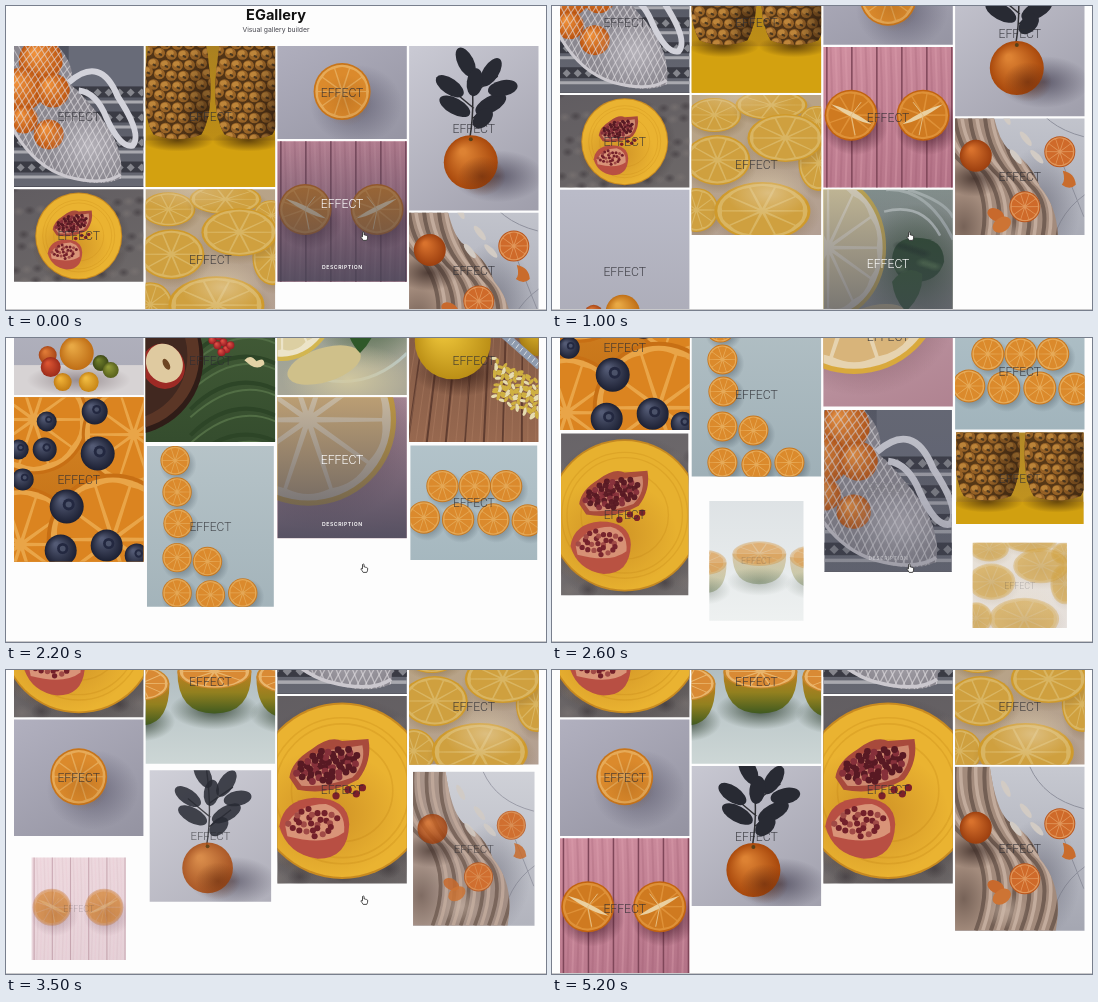
An HTML page with a canvas for the animation above (5.3 s loop, 540 px wide and 304 px high).

```html
<!DOCTYPE html>
<html lang="en">
<head>
<meta charset="utf-8">
<title>EGallery</title>
<style>
html, body { margin: 0; width: 100%; height: 100%; overflow: hidden; background: #fdfdfd; }
canvas { display: block; }
</style>
</head>
<body>
<canvas id="stage" width="540" height="304"></canvas>
<script>
const g = document.getElementById('stage').getContext('2d');
const LOOP = 5300, COL_W = 129.4, COL_STEP = 131.7, GAP = 2.2;
const clamp = v => Math.max(0, Math.min(1, v));
const smooth = v => (v = clamp(v), v * v * (3 - 2 * v));

// Drawing helpers; every picture is drawn around its own centre.
function oval(x, y, rx, ry, fill, rot = 0) {
  g.beginPath();
  g.ellipse(x, y, rx, ry, rot, 0, 7);
  g.fillStyle = fill;
  g.fill();
}
const disc = (x, y, r, fill) => oval(x, y, r, r, fill);
function shape(d, fill, stroke, width = 1) {
  const path = new Path2D(d);
  if (fill) { g.fillStyle = fill; g.fill(path); }
  if (stroke) { g.strokeStyle = stroke; g.lineWidth = width; g.stroke(path); }
}
function box(x, y, w, h, fill) { g.fillStyle = fill; g.fillRect(x, y, w, h); }
function backdrop(top, bottom, slant = 0) {
  const fill = g.createLinearGradient(-slant, -80, slant, 80);
  fill.addColorStop(0, top);
  fill.addColorStop(1, bottom);
  box(-130, -130, 260, 260, fill);
}
function ball(x, y, r, light, dark) {
  const fill = g.createRadialGradient(x - r * .3, y - r * .4, r * .1, x, y, r);
  fill.addColorStop(0, light);
  fill.addColorStop(1, dark);
  disc(x, y, r, fill);
}
// Soft patch of light or shadow; rgb is a "r,g,b" triple.
function glow(x, y, rx, ry, rgb, alpha) {
  g.save();
  g.translate(x, y);
  g.scale(rx, ry);
  const fill = g.createRadialGradient(0, 0, 0, 0, 0, 1);
  fill.addColorStop(0, `rgba(${rgb},${alpha})`);
  fill.addColorStop(1, `rgba(${rgb},0)`);
  disc(0, 0, 1, fill);
  g.restore();
}
function clipped(d, draw) {
  g.save();
  g.clip(new Path2D(d));
  draw();
  g.restore();
}
function slice(x, y, rx, ry = rx, rind = '#c8751a', pith = '#e6aa58', flesh = '#db8a2c', parts = 10) {
  oval(x, y, rx, ry, rind);
  oval(x, y, rx * .94, ry * .94, pith);
  g.fillStyle = flesh;
  for (let i = 0; i < parts; i++) {
    const a = (i + .04) / parts * 2 * Math.PI, b = (i + .96) / parts * 2 * Math.PI, m = (a + b) / 2;
    g.beginPath();
    g.moveTo(x + Math.cos(m) * rx * .1, y + Math.sin(m) * ry * .1);
    g.lineTo(x + Math.cos(a) * rx * .84, y + Math.sin(a) * ry * .84);
    g.quadraticCurveTo(x + Math.cos(m) * rx * .92, y + Math.sin(m) * ry * .92,
      x + Math.cos(b) * rx * .84, y + Math.sin(b) * ry * .84);
    g.fill();
  }
}
const slices = (points, ...look) => points.forEach(([x, y]) => slice(x, y, ...look));

const pictures = {
  bag: [141, () => {
    backdrop('#4d505d', '#686a74');
    box(-10, -72, 80, 42, '#686b78');
    for (let y = -30; y < 80; y += 25) {
      box(-70, y, 140, 11, '#3a3b44');
      box(-70, y + 14, 140, 3, '#a9a9af');
      for (let x = -62; x < 66; x += 11) shape(`M${x} ${y + 6}l4 -4 4 4 -4 4z`, '#85868d');
    }
    const net = 'M-66 -72L-22 -72Q-2 -50 -8 -32Q8 -18 26 6Q46 34 42 62Q20 72 -14 60Q-44 48 -66 16Z';
    shape(net, '#8b8890');
    for (const [x, y, r] of [[-38, -56, 22], [-57, -27, 22], [-26, -26, 17], [-30, 18, 15], [-55, 3, 14]])
      ball(x, y, r, '#f0913a', '#b9520f');
    clipped(net, () => {
      for (let i = -150; i < 150; i += 7)
        shape(`M${i} -80Q${i + 50} 0 ${i + 80} 80M${i} 80Q${i + 40} 0 ${i + 110} -80`, null, 'rgba(226,222,226,.6)', 1.1);
      glow(10, 30, 40, 36, '225,222,228', .5);
    });
    shape('M-66 12Q-45 50 -12 60Q24 70 42 58', null, '#cbc8ce', 3);
    shape('M-10 -34Q22 -62 39 -20Q64 18 54 29Q42 32 28 2Q18 -24 0 -26', null, '#d2d2da', 6);
  }],
  pineapple: [141, () => {
    backdrop('#a87f22', '#c9960f');
    box(-70, 24, 140, 60, '#d3a110');
    for (const x of [-33, 38]) {
      glow(x, 24, 36, 11, '90,60,10', .9);
      clipped(`M${x - 28} -75Q${x - 40} -10 ${x - 24} 18Q${x} 27 ${x + 24} 18Q${x + 40} -10 ${x + 28} -75Z`, () => {
        box(x - 40, -80, 80, 112, '#513416');
        for (let row = 0; row < 10; row++)
          for (let i = -3; i < 4; i++) {
            const px = x + i * 12 + row % 2 * 6, py = -72 + row * 10.5 - i * i * .5;
            oval(px, py, 5.6, 5.2, '#996427');
            oval(px - 1, py - 1.5, 3.4, 2.6, '#bd853a', -.3);
            oval(px + 1, py + 1.5, 2, 1.2, '#4b3820', .4);
          }
        glow(x + 26, 0, 24, 80, '40,24,12', .55);
      });
    }
  }],
  half: [117, () => {
    backdrop('#b3b2c1', '#92919f', 50);
    glow(14, 12, 46, 40, '75,72,92', .6);
    slice(0, -1, 28.5);
    glow(4, 8, 26, 26, '150,85,20', .3);
  }],
  leaf: [164.5, () => {
    backdrop('#c9c9d3', '#a09fac', 60);
    glow(24, 48, 46, 26, '70,66,84', .75);
    shape('M-4 10Q2 -25 -4 -70M-1 -10L22 -28M0 -20L-24 -40M-1 -35L24 -52', null, '#2f2f33', 1.5);
    for (const [x, y, r, a] of [[-8, -66, 16, 1.1], [-24, -42, 16, .6], [17, -56, 16, -1],
      [-19, -22, 17, .5], [17, -24, 17, -.5], [29, -40, 15, -.2], [1, -46, 14, 1.7], [9, -10, 12, -.8]])
      oval(x, y, r, 8, '#282a33', a);
    ball(-3, 34, 27, '#dd8233', '#a8480c');
    glow(8, 48, 24, 20, '95,38,12', .6);
    disc(-3, 11, 2, '#584018');
  }],
  plate: [92.5, () => {
    backdrop('#5f5b60', '#6f6a69', 30);
    for (let i = 0; i < 60; i++)
      glow(i * 47 % 130 - 65, i * 31 % 94 - 47, 6, 5, i % 2 ? '125,118,116' : '62,56,60', .6);
    glow(2, 4, 50, 50, '40,30,30', .9);
    disc(0, .5, 43.5, '#c88a20');
    disc(0, .5, 42.5, '#eab331');
    for (const r of [36, 33, 25]) {
      g.beginPath();
      g.arc(0, .5, r, 0, 7);
      g.strokeStyle = 'rgba(200,140,25,.35)';
      g.lineWidth = .8;
      g.stroke();
    }
    glow(-8, 12, 38, 32, '178,110,25', .5);
    shape('M-26 -6Q-25 -14 -15 -20Q-6 -27 0 -24L13 -25Q15 -14 8 -5Q-6 3 -22 0Z', '#a84a3c');
    shape('M-23 -6Q-20 -15 -10 -19L10 -22Q12 -13 5 -6Q-8 -1 -20 -2Z', '#cf8a70');
    shape('M-31 18Q-29 5 -14 4Q3 4 3.5 17Q3 34 -12 34Q-27 32 -31 18Z', '#b84f43');
    shape('M-28 18Q-22 7 -8 7Q2 10 1 21Q-8 28 -27 23Z', '#d99478');
    for (let i = 0; i < 54; i++) {
      const a = i * 2.4, r = Math.sqrt(i / 54);
      disc(-7 + Math.cos(a) * r * 16, -12 + Math.sin(a) * r * 8 - Math.cos(a) * r * 3, 1.7, i % 3 ? '#581923' : '#86303a');
      if (i % 2) disc(-14 + Math.cos(a) * r * 13, 16 + Math.sin(a) * r * 7, 1.5, i % 3 ? '#73202a' : '#a04a46');
    }
    for (const [x, y] of [[3, 0], [7, 2], [10, -1], [-3, 3]]) disc(x, y, 1.8, '#7c2029');
  }],
  pink: [141, () => {
    backdrop('#d08fa0', '#b27186', 40);
    for (let x = -62; x < 66; x += 25) {
      box(x, -80, 1.5, 160, '#7f4659');
      for (let i = 4; i < 24; i += 5)
        shape(`M${x + i} -80Q${x + i + 4} 0 ${x + i} 80`, null, i % 2 ? 'rgba(225,165,180,.3)' : 'rgba(145,80,100,.2)', 2);
    }
    for (const [x, s] of [[-37, 1], [35, -1]]) {
      glow(x + 4, 9, 33, 29, '60,20,35', .95);
      slice(x, -2, 26.5, 25.5, '#c26310', '#de9138', '#cf7a20', 9);
      shape(`M${x - s * 20} -13Q${x} -8 ${x + s * 21} 7Q${x + s * 3} 4 ${x - s * 20} -13Z`, '#ead0a0');
      shape(`M${x} -2L${x + s * 4} 18M${x} -2L${x + s * 10} -15`, null, '#e5bd80', 1);
    }
  }],
  slices: [141, () => {
    backdrop('#b9a483', '#b3a094', 30);
    for (const [x, y, rx, ry] of [[-42, -50, 27, 17], [15, -60, 36, 15], [61, -44, 18, 15], [62, -2, 20, 28],
      [-39, -5, 33, 25], [29, -27, 38, 24], [-60, 45, 22, 22], [6, 46, 48, 29]]) {
      glow(x + 2, y + 5, rx * 1.15, ry * 1.15, '120,90,50', .8);
      slice(x, y, rx, ry, '#cf9a2c', '#d9b562', '#cfa03f', 10);
    }
    glow(12, 28, 42, 26, '232,215,180', .55);
    glow(-20, -68, 60, 20, '225,210,185', .4);
  }],
  cloth: [164, () => {
    backdrop('#c6c8d0', '#a5a7b2');
    shape('M10 -82Q24 -50 64 -40M30 82Q34 40 65 18M44 -10L64 40', null, '#8f919d', 1);
    const drape = 'M-66 -82L-30 -82Q-24 -40 -12 -28Q12 -14 20 10Q44 38 36 82L-66 82Z';
    glow(20, 30, 40, 60, '80,80,95', .5);
    shape(drape, '#a38b7c');
    clipped(drape, () => {
      for (let i = 0; i < 7; i++) {
        const x = -80 + i * 15;
        shape(`M${x} -82Q${x - 4} -30 ${x + 30} ${-8 + i * 4}Q${x + 56} 30 ${x + 36} 82`, null, '#735f54', 4);
        shape(`M${x + 6} -82Q${x + 4} -32 ${x + 36} ${-10 + i * 4}Q${x + 62} 28 ${x + 43} 82`, null, '#c2ab9c', 3.5);
      }
      glow(-46, 2, 30, 18, '62,45,40', .8);
      glow(-56, 50, 24, 34, '90,72,64', .6);
      glow(-14, 62, 22, 18, '205,185,170', .6);
    });
    for (const [x, y, a] of [[-14, -60, 1.1], [6, -38, .9], [17, -20, .8], [-4, -20, .9]])
      oval(x, y, 9, 3, '#d2cbc4', a);
    ball(-44, -21, 16, '#d9722d', '#9c3f0f');
    slice(40, -25, 15.5, 15.5, '#b9541a', '#e0965a', '#cf6a2a');
    slice(5, 30, 15.5, 15.5, '#b9541a', '#e0965a', '#cf6a2a');
    shape('M43 -6Q55 -4 56 8Q50 14 42 8Q46 4 43 -6Z', '#c96c2c');
    oval(-24, 38, 9, 6, '#c8692c', .5);
    oval(-18, 48, 10, 7, '#cd7434', -.6);
  }],
  citrus: [164, () => {
    backdrop('#babbc8', '#a9a9b5');
    box(-70, 52, 140, 40, '#d7d3d4');
    glow(0, 67, 52, 16, '110,95,100', .6);
    for (const [x, y, r, light, dark] of [[-2, 40, 17, '#e8a844', '#bf6e16'], [-31, 42, 9, '#df7a36', '#a84618'],
      [22, 50, 8, '#71802b', '#3c4716'], [-28, 54, 10, '#da5432', '#9c2b1a'], [32, 57, 8, '#919a38', '#56601c'],
      [-16, 69, 9, '#f0b236', '#c27c14'], [10, 69, 10, '#f0bb41', '#c78516']]) ball(x, y, r, light, dark);
  }],
  apples: [164, () => {
    backdrop('#465f39', '#354d2e');
    for (let i = 0; i < 7; i++) {
      const y = -75 + i * 26;
      shape(`M-20 ${y + 20}Q20 ${y - 20} 65 ${y}`, null, '#2d4527', 4);
      shape(`M-20 ${y + 28}Q24 ${y - 12} 65 ${y + 6}`, null, '#526e45', 2);
    }
    disc(-84, -2, 77, '#2f1c17');
    disc(-86, -5, 75, '#5b3626');
    disc(-88, -5, 65, '#412820');
    ball(-55, -49, 23, '#c94a3c', '#782020');
    oval(-48, -45, 12, 19, '#d8c196', .3);
    oval(-47, 6, 21, 23, '#9d2a25', -.5);
    oval(-46, 3, 18, 20, '#dfcaa0', -.5);
    oval(-44, 4, 3, 6, '#6d4522', -.5);
    for (const [x, y] of [[2, -20], [8, -24], [13, -18], [7, -15], [16, -11], [11, -8], [20, -15]])
      ball(x, y, 4, '#df5146', '#971c22');
    shape('M34 0Q40 -7 46 1Q54 -4 54 4Q48 10 40 5Z', '#e4d3a6');
  }],
  mint: [164, () => {
    backdrop('#8f9f98', '#a9a696', 20);
    glow(28, -6, 60, 62, '48,80,42', .9);
    shape('M-2 -82Q40 -84 65 -32M20 -82Q58 -70 65 -54M-40 60Q20 84 65 40', null, '#bac6c0', 3);
    shape('M-4 -60Q34 -70 52 -36', null, '#c9d4cd', 2.5);
    glow(6, 66, 66, 36, '212,202,160', .9);
    oval(-18, 52, 38, 17, '#cfc08a', -.3);
    slice(-60, -24, 58, 72, '#d3b650', '#ece4c9', '#dccfa2', 12);
    shape('M4 -14Q6 -34 28 -34Q56 -34 56 -10Q50 10 28 10Q6 10 4 -14Z', '#274a26');
    shape('M4 10Q18 -8 34 2Q36 22 18 40Q6 28 4 10Z', '#2f5829');
    for (let i = 0; i < 9; i++)
      glow(12 + i * 23 % 40, -26 + i * 17 % 32, 8, 5, i % 2 ? '100,145,82' : '20,42,24', .6);
  }],
  lemons: [164, () => {
    backdrop('#795442', '#97684f');
    for (let x = -85; x < 80; x += 19) shape(`M${x} 82L${x * .8 + 10} -82`, null, '#603d30', 2);
    for (let x = -82; x < 80; x += 8) shape(`M${x} 82L${x * .8 + 12} -82`, null, 'rgba(190,140,110,.3)', 1);
    ball(-45, -68, 28, '#d6ad2b', '#9d7412');
    ball(40, -62, 28, '#e6bd31', '#ae8517');
    ball(67, -26, 22, '#dfb72d', '#a67c14');
    glow(-14, 12, 46, 24, '50,25,18', .8);
    shape('M-4 -56L66 6', null, '#8f9bae', 8);
    for (let i = 0; i < 18; i++) shape(`M${-3 + i * 4} ${-58 + i * 3.5}l-3 4`, null, '#dbe0e5', 1);
    for (let i = 0; i < 110; i++) {
      const x = i * 37.7 % 46;
      oval(20 + x, i * 23.3 % 40 - 2 + x * .5, 3.2, 1.6, i % 3 ? '#cfb041' : '#e6dcae', i);
    }
    ball(-21, -19, 38, '#f0c83c', '#bb8f16');
  }],
  berries: [164.5, () => {
    backdrop('#d68626', '#bf6c12');
    for (const [x, y, r] of [[-45, -60, 55], [55, -45, 52], [-58, 65, 58], [34, 60, 66]])
      slice(x, y, r, r, '#c76f14', '#e9a548', '#db8420', 10);
    for (const [x, y, r] of [[19, -26, 17], [16, -68, 13], [-32, -58, 10], [-34, -30, 12], [-60, -30, 10],
      [-56, 0, 11], [-12, 27, 17], [-18, 71, 16], [28, 66, 16], [58, 76, 12]]) {
      ball(x, y, r, '#535a74', '#1c2033');
      disc(x + 2, y - 2, r * .35, '#232840');
      disc(x + 2, y - 2, r * .18, '#4b5269');
    }
  }],
  corner: [164, () => {
    backdrop('#b2c0c5', '#9fb0b7');
    const spots = [[-36, -67], [-34, -35], [-33, -3], [-34, 32], [-3, 36], [-34, 68], [0, 70], [33, 68]];
    spots.forEach(([x, y]) => glow(x + 3, y + 4, 19, 19, '70,85,95', .9));
    slices(spots, 15);
  }],
  rows: [117, () => {
    backdrop('#b1c2c9', '#9fb2ba');
    const spots = [[-32, -17], [1, -17], [33, -17], [-51, 15], [-16, 17], [20, 17], [55, 18]];
    spots.forEach(([x, y]) => glow(x + 3, y + 4, 20, 20, '70,85,95', .9));
    slices(spots, 16.5);
  }],
  cups: [164.5, () => {
    backdrop('#9dabb3', '#ccd6d5');
    for (const [x, y, r] of [[-70, 2, 29], [4, -10, 37], [80, -5, 34]]) {
      glow(x, y + 38, r * 1.2, 20, '50,66,50', .9);
      const rind = g.createLinearGradient(0, y, 0, y + 42);
      rind.addColorStop(0, '#c07f20');
      rind.addColorStop(.5, '#92801f');
      rind.addColorStop(1, '#3f5a20');
      shape(`M${x - r} ${y}Q${x - r} ${y + 42} ${x} ${y + 42}Q${x + r} ${y + 42} ${x + r} ${y}Z`, rind);
      slice(x, y, r, 17, '#c9852a', '#e9b56c', '#d98a34');
    }
  }],
  blush: [141, () => {
    backdrop('#c5a1ac', '#b08391', 40);
    glow(-28, -38, 100, 98, '100,60,70', .8);
    slice(-34, -48, 88, 86, '#d9a93c', '#e6d3b0', '#d8b47a', 10);
  }],
};

// Each tile: picture, height, time it pops in, hover start, hover end.
const columns = [
  [['bag', 141], ['plate', 92.5], ['citrus', 164, 450], ['berries', 164.5, 1460], ['plate', 164.5, 2250],
    ['half', 116.5, 3100], ['pink', 141, 3350]],
  [['pineapple', 141], ['slices', 140], ['apples', 163.5, 1050], ['corner', 164, 1855], ['cups', 164.5, 2450],
    ['leaf', 140, 3200]],
  [['half', 93], ['pink', 140.5, -999, -999, 600], ['mint', 164, 450, 620, 1550], ['blush', 141, 1460, 1750, 2330],
    ['bag', 164.5, 2250, 2500, 3050], ['plate', 187.5, 3100, 3700, 3820]],
  [['leaf', 164.5], ['cloth', 116.5], ['lemons', 163.5, 1050], ['rows', 117, 1855], ['pineapple', 93, 2250],
    ['slices', 117, 2450, 3930, 4190], ['cloth', 164, 3200, 3820, 3930]],
];
const scrollStops = [[0, 0], [100, 0], [700, 94], [1000, 94], [1500, 221], [2200, 384.5], [3000, 648], [3400, 728], [LOOP, 728]];

function scrollAt(t) {
  const i = scrollStops.findIndex(stop => stop[0] > t);
  const [t0, y0] = scrollStops[i - 1], [t1, y1] = scrollStops[i];
  return y0 + (y1 - y0) * (t - t0) / (t1 - t0);
}

function label(text, x, y, font, color, spacing = 0) {
  g.font = font;
  g.letterSpacing = spacing + 'px';
  g.fillStyle = color;
  g.fillText(text, x + spacing / 2, y);
}

function drawTile([name, h, born = -999, from = 9999, to = 9999], x, y, t) {
  const shown = smooth((t - born) / 400);
  if (!shown || y > 304 || y + h < 0) return;
  const hover = clamp((t - from) / 250) - clamp((t - to) / 250);
  const [baseH, paint] = pictures[name];
  const cover = Math.max(1, h / baseH), zoom = .6 + .4 * shown;
  g.save();
  g.globalAlpha = shown;
  g.translate(x + COL_W / 2, y + h / 2);
  g.scale(zoom, zoom);
  g.beginPath();
  g.rect(-COL_W / 2, -h / 2, COL_W, h);
  g.clip();
  g.save();
  g.scale(cover, cover);
  paint();
  g.restore();
  if (hover) {
    const shade = g.createLinearGradient(0, -h / 2, 0, h / 2);
    shade.addColorStop(0, `rgba(70,70,90,${.2 * hover})`);
    shade.addColorStop(1, `rgba(64,68,86,${.8 * hover})`);
    box(-COL_W / 2, -h / 2, COL_W, h, shade);
    label('DESCRIPTION', 0, h / 2 - 12.5, '600 5.2px Inter, sans-serif', `rgba(255,255,255,${hover})`, .5);
  }
  const tone = 45 + 210 * hover;
  label('EFFECT', 0, 4.5 - 8 * hover, '300 12.2px Roboto, sans-serif', `rgba(${tone},${tone},${tone + 5},${.85 + .15 * hover})`);
  g.restore();
}

function drawCursor(t) {
  const move = clamp((t - 3600) / 580);
  g.save();
  g.translate(358 + 122 * move, 230 - 245 * move);
  g.lineJoin = 'round';
  if (t >= 1450 && t < 1650) shape('M0 -4.5V3L1.7 1.5L3 4.2L4.2 3.6L3 1H5Z', '#111', '#fff', .6);
  else shape('M-1.5 -3.5Q-.7 -4.4 .1 -3.5V-1Q1 -1.6 1.6 -.7Q2.4 -1 2.8 -.2Q3.8 -.2 3.7 .8Q3.7 3 2.7 4.4H-.8Q-2 2.5 -3.2 1Q-2.8 -.2 -1.5 .8Z', '#fff', '#222', .8);
  g.restore();
}

function draw(t) {
  const scroll = scrollAt(t);
  box(0, 0, 540, 304, '#fdfdfd');
  g.textAlign = 'center';
  label('EGallery', 270, 14 - scroll, '700 14.6px Inter, sans-serif', '#111');
  label('Visual gallery builder', 270, 25.5 - scroll, '400 6.8px Inter, sans-serif', '#44444c');
  columns.forEach((tiles, i) => {
    let y = 40 - scroll;
    for (const tile of tiles) {
      drawTile(tile, 8 + i * COL_STEP, y, t);
      y += tile[1] + GAP;
    }
  });
  box(0, 303, 540, 1, '#c9c9cb');
  drawCursor(t);
}

function tick() {
  draw(performance.now() % LOOP);
  requestAnimationFrame(tick);
}
tick();
</script>
</body>
</html>
```
